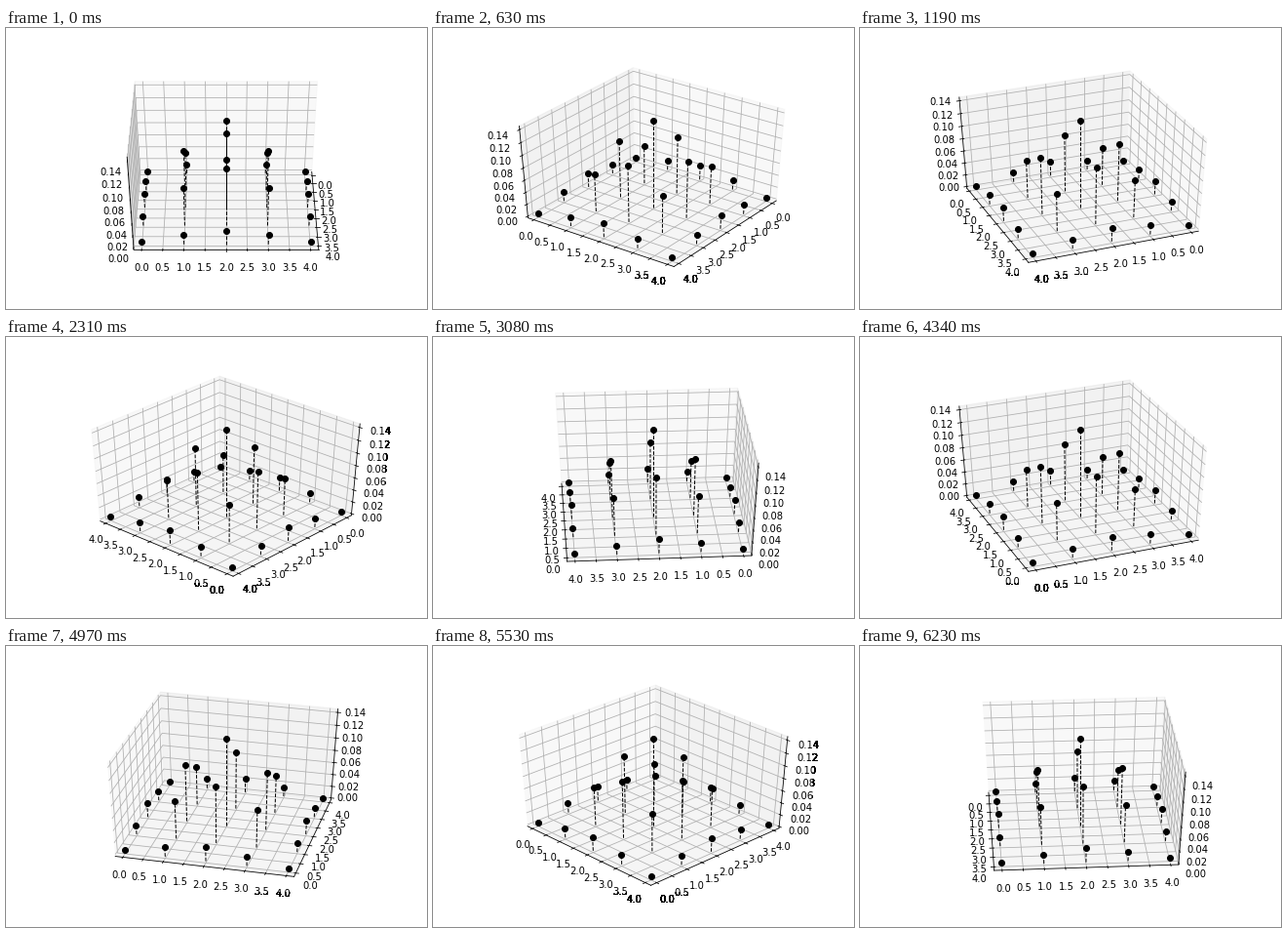
These frames come from a looping animation (432 px wide and 288 px high, 6300 ms). A matplotlib script:

```python
import numpy as np
import matplotlib.pyplot as plt
from matplotlib.animation import FuncAnimation
from matplotlib.transforms import Bbox
from mpl_toolkits.mplot3d import Axes3D

W, H, DPI = 432, 288, 72
FRAMES, INTERVAL = 90, 70

plt.rcParams.update({"font.family": "DejaVu Sans", "font.size": 10})


class StretchedAxes3D(Axes3D):
    """3D axes that fill their rectangle; labels spilling outside look heavy."""

    def apply_aspect(self, position=None):
        pass

    def draw(self, renderer):
        super().draw(renderer)
        right, bottom = round(self.bbox.x1), round(self.bbox.y0)
        below = Bbox.from_extents(0, 0, W, bottom)
        beside = Bbox.from_extents(right, bottom, W, H)
        for axis in (self.xaxis, self.yaxis, self.zaxis):
            for tick in axis.get_major_ticks():
                label = tick.label1
                box = label.get_window_extent(renderer)
                if box.y0 < bottom:
                    thicken(label, below, renderer)
                if box.x1 > right:
                    thicken(label, beside, renderer)


def thicken(label, clip, renderer, passes=12):
    label.set_clip_box(clip)
    label.set_clip_on(True)
    for _ in range(passes):
        label.draw(renderer)
    label.set_clip_on(False)


def padded(low, high):
    pad = (high - low) / 48
    return low - pad, high + pad


fig = plt.figure(figsize=(W / DPI, H / DPI), dpi=DPI, facecolor="white")
ax = StretchedAxes3D(fig, [0.125, 0.125, 0.775, 0.755])
fig.add_axes(ax)

# Joint probabilities of two independent Binomial(4, 1/2) variables
pmf = np.array([1, 4, 6, 4, 1]) / 16
for x in range(5):
    for y in range(5):
        p = pmf[x] * pmf[y]
        ax.plot([x, x], [y, y], [0, p], "k--", lw=1)
        ax.plot([x], [y], [p], "ko", ms=6)

halves = np.arange(0, 4.1, 0.5)
heights = np.arange(0, 0.15, 0.02)
ax.set_xticks(halves, [f"{v:.1f}" for v in halves])
ax.set_yticks(halves, [f"{v:.1f}" for v in halves])
ax.set_zticks(heights, [f"{v:.2f}" for v in heights])
ax.set_xlim(*padded(-0.1, 4.1))
ax.set_ylim(*padded(-0.1, 4.1))
ax.set_zlim(*padded(0, 0.1425))

# Unit cube inside the padding
ax.set_box_aspect((1, 1, 1), zoom=3 ** 0.5 / 1.8294640721620434)


def update(i):
    ax.view_init(elev=40, azim=i * 360 / FRAMES)
    return []


anim = FuncAnimation(fig, update, frames=FRAMES, interval=INTERVAL,
                     init_func=lambda: [], repeat=True, repeat_delay=0)
plt.show()
```
